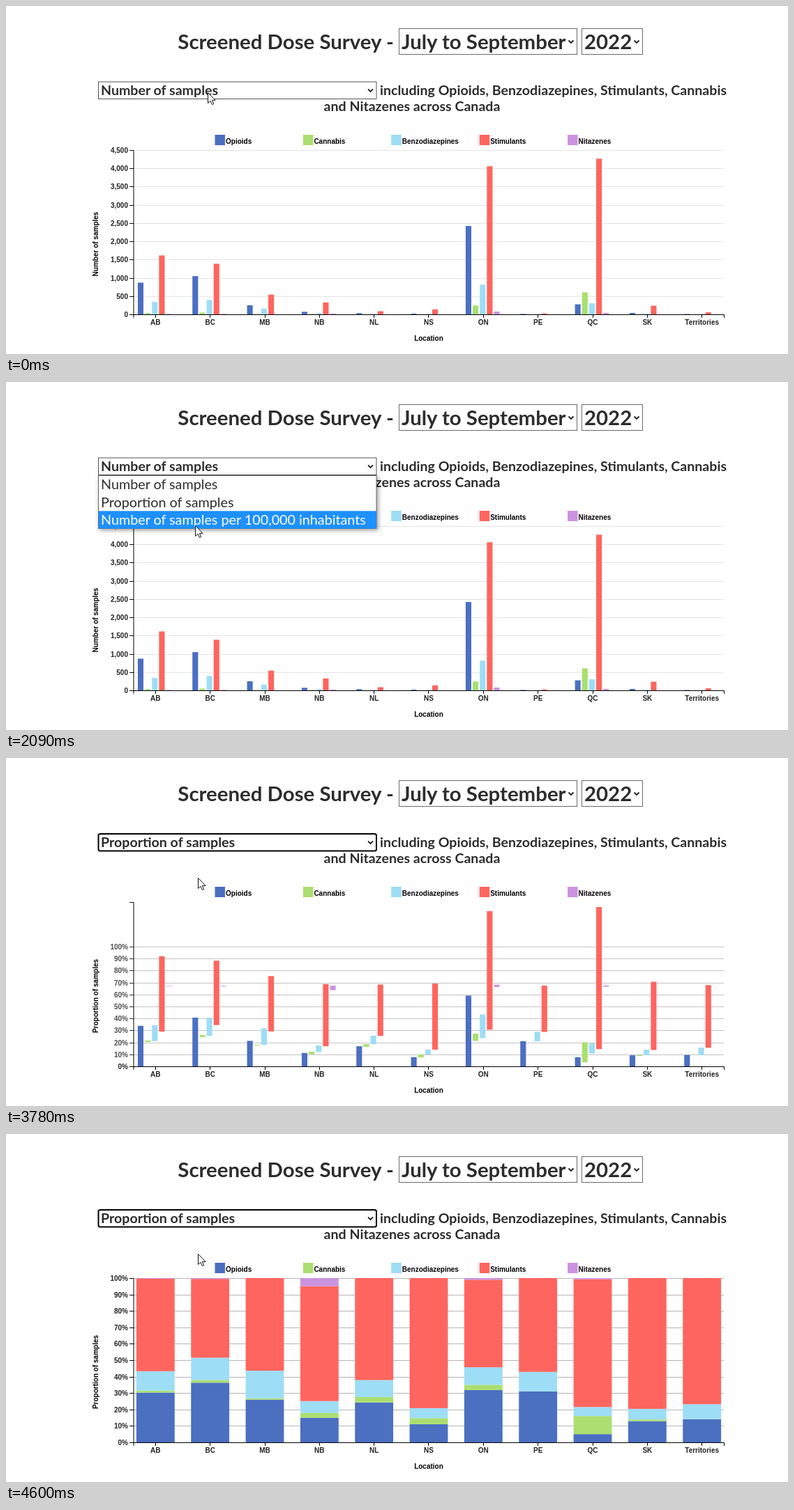
An HTML page that plays this animation: 1121x500 px, repeating every 5470 ms.

```html
<!DOCTYPE html>
<html lang="en">
<head>
<meta charset="utf-8">
<title>Chart transition</title>
<style>
  html, body { margin: 0; width: 100%; height: 100%; overflow: hidden; background: #fff; }
  svg { display: block; }
  .head { font: 700 19.6px Lato, sans-serif; fill: #2d2d2d; }
  .title { font-size: 29.4px; }
  .menu { font: 400 19.75px Lato, sans-serif; fill: #2d2d2d; }
  .chart { font: 700 10px "Liberation Sans", Arial, sans-serif; fill: #000; }
  .end { text-anchor: end; }
  .mid { text-anchor: middle; }
  .box { fill: #fff; stroke: #6b6b6b; }
  .arrow { fill: none; stroke: #222; stroke-width: 1.8; }
  .domain, .axis { fill: none; stroke: #000; }
  .axis { shape-rendering: crispEdges; }
  .grid { stroke: #e3e3e3; shape-rendering: crispEdges; }
  .new .grid { stroke: #b5b5b5; }
  .tick { fill: #222; }
  #list { filter: drop-shadow(2px 2px 3px rgba(0, 0, 0, .4)); }
</style>
</head>
<body>
<svg id="stage" width="1121" height="500" xmlns="http://www.w3.org/2000/svg">
  <g class="head">
    <g class="title">
      <text class="end" x="556" y="62">Screened Dose Survey -</text>
      <rect class="box" x="563.5" y="32.5" width="255" height="37"/>
      <text x="567" y="62">July to September</text>
      <rect class="box" x="825.5" y="32.5" width="87" height="37"/>
      <text x="829" y="62">2022</text>
    </g>
    <text x="536" y="128">including Opioids, Benzodiazepines, Stimulants, Cannabis</text>
    <text class="mid" x="582" y="151">and Nitazenes across Canada</text>
    <rect id="select" class="box" x="132.5" y="109" width="398.5" height="24.5"/>
    <text id="choice" x="136" y="128"></text>
  </g>
  <path class="arrow" d="M806.5 49.5l3.5 3.5 3.5-3.5M900.5 49.5l3.5 3.5 3.5-3.5M519 119.5l3.5 3.5 3.5-3.5"/>
  <g class="chart">
    <g id="legend"></g>
    <g id="oldAxis"></g>
    <g id="newAxis" class="new"></g>
    <g id="bars"></g>
    <path class="domain" d="M177 207.5H183V443.5H177M183 448V443.5H1029.5V448"/>
    <g id="places"></g>
    <text class="mid" x="606" y="481">Location</text>
    <text id="measure" class="mid" transform="translate(132 342) rotate(-90)"></text>
  </g>
  <g id="list">
    <rect class="box" x="132.5" y="134.5" width="398.5" height="76"/>
    <rect id="hover" x="133" width="398" height="25.4" fill="#1e90ff"/>
    <g id="options" class="menu"></g>
  </g>
  <path id="cursor" fill="#fff" stroke="#111" d="M.5.5V15.5L4 12.3 6.4 17.6 8.7 16.6 6.4 11.4H11Z"/>
  <circle id="click" r="11" fill="#ff0" fill-opacity=".47"/>
</svg>
<script>
const LOOP = 5470, OPEN = 1140, CLOSE = 3500;
const LEFT = 183, RIGHT = 1029, BASE = 443, HEIGHT = 236;
const STEP = (RIGHT - LEFT) / 10.8, BAND = STEP * 0.7;
const ROW = 25.4, MENU = 134.5;

const series = [
  ["Opioids", "#4b6fc1"], ["Cannabis", "#abdf70"], ["Benzodiazepines", "#9eddf6"],
  ["Stimulants", "#ff655f"], ["Nitazenes", "#cb93df"]
];
// place, samples, then % opioids, cannabis, benzodiazepines, nitazenes; stimulants are the rest
const places = [
  ["AB", 2865, 30.3, 1.2, 11.8, 0.4],
  ["BC", 2885, 36.3, 1.6, 13.6, 0.5],
  ["MB", 955, 26, 0.8, 16.8],
  ["NB", 465, 15, 2.9, 7.2, 5],
  ["NL", 137, 24.3, 3.3, 10.3],
  ["NS", 170, 11, 3.7, 6.1],
  ["ON", 7610, 31.8, 3.2, 10.7, 1],
  ["PE", 42, 31, 0, 11.9],
  ["QC", 5480, 5, 11, 5.5, 0.7],
  ["SK", 295, 12.9, 1, 6.5],
  ["Territories", 72, 14, 0, 9.2]
];
const options = ["Number of samples", "Proportion of samples", "Number of samples per 100,000 inhabitants"];
// time, x, y of the pointer tip
const path = [[1328, 289, 124], [1600, 280, 153], [2060, 271, 207], [2756, 275, 172]];

const $ = id => document.getElementById(id);
const set = (el, attrs) => { for (const k in attrs) el.setAttribute(k, attrs[k]); };
function add(parent, tag, attrs, text) {
  const el = document.createElementNS("http://www.w3.org/2000/svg", tag);
  set(el, attrs);
  if (text) el.textContent = text;
  return parent.appendChild(el);
}
const show = (id, on) => $(id).setAttribute("visibility", on ? "visible" : "hidden");
const mix = (a, b, k) => a + (b - a) * k;
const clamp = k => Math.min(1, Math.max(0, k));
const cubic = k => k < 0.5 ? 4 * k ** 3 : 1 - 4 * (1 - k) ** 3;
const ease = (t, start) => cubic(clamp((t - start) / 500));
// The screen is refreshed every 68 ms.
const snap = t => 1396 + 68 * Math.floor((t - 1396) / 68);

function addTick(parent, label, y) {
  const g = add(parent, "g", { transform: `translate(0 ${y})` });
  if (y < BASE) add(g, "path", { class: "grid", d: `M${LEFT} .5H${RIGHT}` });
  add(g, "path", { class: "axis", d: "M177 .5H183" });
  add(g, "text", { class: "tick end", x: 175, y: 4 }, label);
  return g;
}

for (let i = 0; i < 10; i++)
  addTick($("oldAxis"), (i * 500).toLocaleString("en-US"), BASE - HEIGHT * i / 9);
const ticks = Array.from({ length: 11 }, (_, i) => addTick($("newAxis"), i * 10 + "%", BASE - i));

series.forEach(([name, fill], s) => {
  const x = 299.5 + 126.4 * s;
  add($("legend"), "rect", { x, y: 185, width: 14.5, height: 15, fill });
  add($("legend"), "text", { x: x + 15.5, y: 198 }, name);
});

const bars = [];
places.forEach(([name, total, opioids, cannabis, benzos, nitazenes = 0], i) => {
  const left = LEFT + STEP * (i + 0.05), x = left + BAND / 2;
  add($("places"), "path", { class: "axis", d: `M${Math.floor(x) + 0.5} 444V448` });
  add($("places"), "text", { class: "tick mid", x, y: 457.5 }, name);

  const stimulants = 100 - opioids - cannabis - benzos - nitazenes;
  let sum = 0;
  [opioids, cannabis, benzos, stimulants, nitazenes].forEach((percent, s) => {
    const share = percent / 100;
    bars.push({
      el: add($("bars"), "rect", { fill: series[s][1] }),
      left,
      slot: left + 2 + 10.15 * s,
      count: share * total / 4500,
      share,
      below: sum
    });
    sum += share;
  });
});

const rows = options.map((text, i) => add($("options"), "text", { x: 136, y: MENU + 19.7 + ROW * i }, text));

function pointer(t) {
  const time = Math.min(Math.max(t, path[0][0]), path.at(-1)[0]);
  const n = path.findIndex((p, i) => i && p[0] >= time), [a, b] = [path[n - 1], path[n]];
  const k = (time - a[0]) / (b[0] - a[0]);
  return [mix(a[1], b[1], k), mix(a[2], b[2], k)];
}

function drawControls(t, now) {
  const done = t >= CLOSE;
  $("choice").textContent = $("measure").textContent = options[done ? 1 : 0];
  set($("select"), done
    ? { style: "stroke:#000;stroke-width:2", rx: 2.5 }
    : { style: "stroke:#555;stroke-width:1", rx: 0 });

  const [x, y] = pointer(now);
  set($("cursor"), { transform: `translate(${Math.round(x)} ${Math.round(y)})` });
  set($("click"), { cx: x, cy: y });
  show("click", (t >= 980 && t < OPEN) || (t >= 3370 && t < CLOSE));

  show("list", t >= OPEN && t < CLOSE);
  const row = Math.max(0, Math.floor((y - MENU) / ROW));
  set($("hover"), { y: MENU + ROW * row });
  rows.forEach((el, i) => set(el, { fill: i === row ? "#fff" : "#2d2d2d" }));
}

function drawChart(t, now) {
  const done = t >= CLOSE, grow = ease(now, 3480), lift = ease(now, 3528), widen = ease(now, 4042);
  show("oldAxis", !done);
  show("newAxis", done);
  ticks.forEach((el, i) => set(el, {
    transform: `translate(0 ${BASE - HEIGHT * grow * i / 10})`,
    opacity: i ? grow ** 0.7 : 1
  }));
  for (const { el, left, slot, count, share, below } of bars) {
    const height = HEIGHT * mix(count, share, lift);
    set(el, {
      x: mix(slot, left, widen),
      width: mix(8.1, BAND, widen),
      y: BASE - HEIGHT * below * lift - height,
      height
    });
  }
}

const begin = performance.now();
function frame() {
  const t = (performance.now() - begin) % LOOP, now = snap(t);
  drawControls(t, now);
  drawChart(t, now);
  requestAnimationFrame(frame);
}
frame();
</script>
</body>
</html>
```
